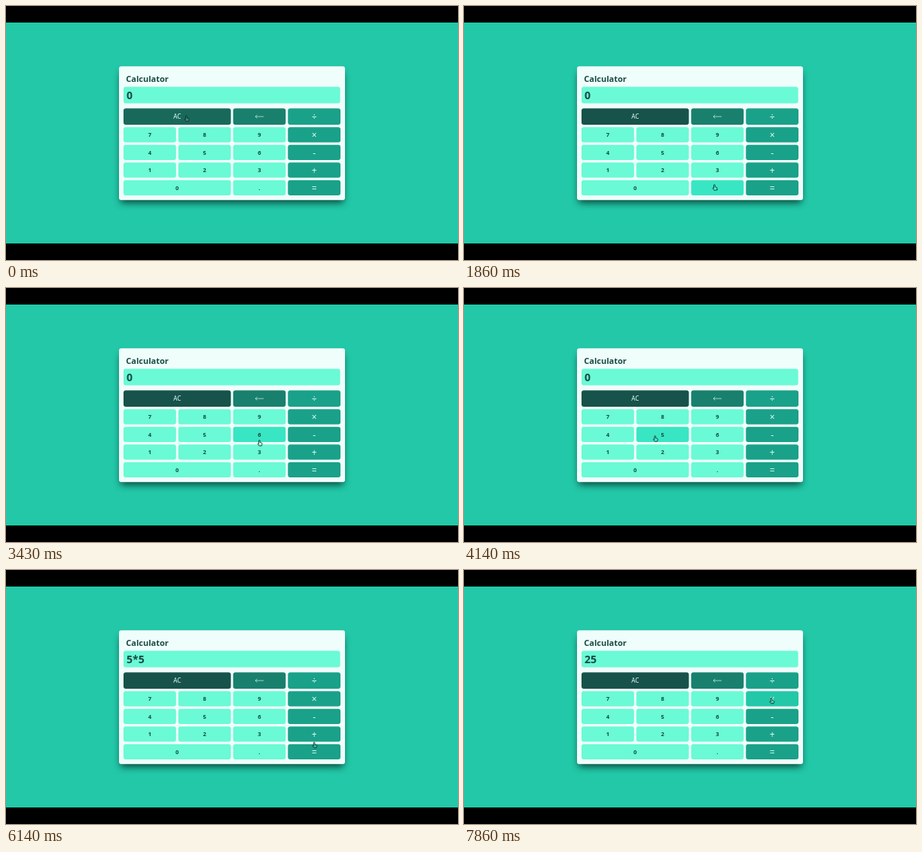
These frames come from a looping animation (600x338 px, 8000 ms). An HTML page with a canvas:

```html
<!DOCTYPE html>
<html lang="en">
<head>
<meta charset="utf-8">
<title>Calculator</title>
<style>
  html, body { margin: 0; width: 100%; height: 100%; overflow: hidden; background: #000; }
  canvas { display: block; width: 600px; height: 338px; }
</style>
</head>
<body>
<canvas id="stage"></canvas>
<script>
const W = 600, H = 338, BAR = 22, LOOP = 8000, TICKS = 56;
const FONT = '"Noto Sans", "Open Sans", sans-serif';
const canvas = document.getElementById('stage');
const ctx = canvas.getContext('2d');
const ratio = window.devicePixelRatio || 1;
canvas.width = W * ratio;
canvas.height = H * ratio;
ctx.scale(ratio, ratio);

const INK = '#174a43', PALE = '#e2fbf4', MINT = '#6afad5';
const KINDS = {
  digit: { fill: MINT, hover: '#39e6c3', ink: '#15453e', font: '600 7.5px ', drop: 2.8 },
  op: { fill: '#1aa189', hover: '#22c8a8', ink: PALE, font: '500 12px ', drop: 4.6 },
  back: { fill: '#19806e', hover: '#1aa189', ink: PALE },
  clear: { fill: '#17534a', hover: '#19695b', ink: PALE, font: '400 8px ', drop: 3 }
};

// Key grid: four equal columns, a taller first row, then four equal rows
const LEFT = 156, GAP = 3, KEY_W = 69.75, KEY_H = 20.4;
const keys = {};
function addKey(label, kind, col, row, span = 1) {
  const w = span * (KEY_W + GAP) - GAP;
  const h = row ? KEY_H : 21.7;
  const x = LEFT + col * (KEY_W + GAP);
  const y = row ? 161.2 + (row - 1) * 23.5 : 136.3;
  keys[label] = { label, kind, x, y, w, h, cx: x + w / 2, cy: y + h / 2 };
}
addKey('AC', 'clear', 0, 0, 2);
addKey('←', 'back', 2, 0);
['789', '456', '123'].forEach((line, r) =>
  [...line].forEach((d, c) => addKey(d, 'digit', c, r + 1)));
addKey('0', 'digit', 0, 4, 2);
addKey('.', 'digit', 2, 4);
[...'÷×-+='].forEach((s, r) => addKey(s, 'op', 3, r));

// Pointer stops: tick, key, offset from the key's middle
const ROUTE = [
  [0, 'AC', 12, -1], [4, '←'], [6, '÷', -5, 3], [8, '×', -7, 5],
  [11, '=', -4], [13, '.', -4, -4], [16, '1'], [19, '8', -26, 9],
  [22, '9'], [25, '3'], [29, '5', -10, 2], [31, '5', -8], [34, '×'],
  [38, '5'], [40, '5'], [43, '+', 0, 11], [45, '='], [50, '='],
  [55, '×', -1, -1], [TICKS, '×', -1, -1]
];
const SCREENS = [[0, '0'], [31, '5'], [34, '5*'], [39, '5*5'], [46, '25']];

function stopPoint([, label, dx = 0, dy = 0]) {
  return { x: keys[label].cx + dx, y: keys[label].cy + dy };
}

function pointerAt(tick) {
  const i = ROUTE.findIndex(stop => stop[0] > tick);
  const from = ROUTE[i - 1], to = ROUTE[i];
  const a = stopPoint(from), b = stopPoint(to);
  const k = (tick - from[0]) / (to[0] - from[0]);
  return { x: a.x + (b.x - a.x) * k, y: a.y + (b.y - a.y) * k };
}

function box(x, y, w, h, r, fill) {
  ctx.fillStyle = fill;
  ctx.beginPath();
  ctx.roundRect(x, y, w, h, r);
  ctx.fill();
}

function text(str, x, y, font, fill, align = 'left') {
  ctx.font = font + FONT;
  ctx.fillStyle = fill;
  ctx.textAlign = align;
  ctx.fillText(str, x, y);
}

function drawArrow(x, y) {
  ctx.strokeStyle = PALE;
  ctx.lineWidth = 0.65;
  ctx.beginPath();
  ctx.moveTo(x + 5.6, y);
  ctx.lineTo(x - 5.4, y);
  ctx.moveTo(x - 3, y - 2.2);
  ctx.lineTo(x - 5.4, y);
  ctx.lineTo(x - 3, y + 2.2);
  ctx.stroke();
}

function drawKey({ label, kind, x, y, w, h, cx, cy }, p) {
  const style = KINDS[kind];
  const over = p.x >= x && p.x <= x + w && p.y >= y && p.y <= y + h;
  box(x, y, w, h, 3, over ? style.hover : style.fill);
  if (kind === 'back') drawArrow(cx, cy);
  else text(label, cx, cy + style.drop, style.font, style.ink, 'center');
}

function drawHand({ x, y }) {
  ctx.save();
  ctx.translate(x, y);
  ctx.beginPath();
  ctx.moveTo(-0.8, 4.6);
  ctx.lineTo(-0.8, 0.2);
  ctx.quadraticCurveTo(0, -0.8, 0.8, 0.2);
  ctx.lineTo(0.8, 2.8);
  ctx.lineTo(3.2, 3.5);
  ctx.quadraticCurveTo(3.9, 4, 3.6, 5.2);
  ctx.lineTo(2.8, 7.3);
  ctx.lineTo(-0.3, 7.3);
  ctx.lineTo(-2.4, 4.6);
  ctx.quadraticCurveTo(-2.1, 3.6, -0.8, 4.6);
  ctx.fillStyle = 'rgba(190,245,230,.2)';
  ctx.fill();
  ctx.strokeStyle = 'rgba(8,42,38,.9)';
  ctx.lineWidth = 0.9;
  ctx.stroke();
  ctx.restore();
}

function drawCard() {
  ctx.save();
  ctx.shadowColor = 'rgba(0,30,25,.75)';
  ctx.shadowBlur = 10 * ratio;
  ctx.shadowOffsetY = 6 * ratio;
  box(152, 83, 296, 173, 3, '#f0fefb');
  ctx.restore();
  box(150, 80.2, 300, 178, 3, '#f0fefb');
  text('Calculator', 159.3, 101.3, '700 11px ', INK);
  box(LEFT, 107.4, 287.6, 22.2, 3, MINT);
}

function draw(tick) {
  const p = pointerAt(tick);
  ctx.fillStyle = '#000';
  ctx.fillRect(0, 0, W, H);
  ctx.fillStyle = '#22c8a8';
  ctx.fillRect(0, BAR, W, H - 2 * BAR);
  drawCard();
  const shown = SCREENS.filter(([from]) => from <= tick).pop()[1];
  text(shown, 160, 124.3, '700 14px ', INK);
  Object.values(keys).forEach(key => drawKey(key, p));
  drawHand(p);
}

const start = performance.now();
function frame() {
  const t = (performance.now() - start) % LOOP;
  // The picture advances in even ticks; the lead absorbs timer rounding
  draw(Math.floor((t + 5) * TICKS / LOOP) % TICKS);
  requestAnimationFrame(frame);
}
frame();
</script>
</body>
</html>
```
